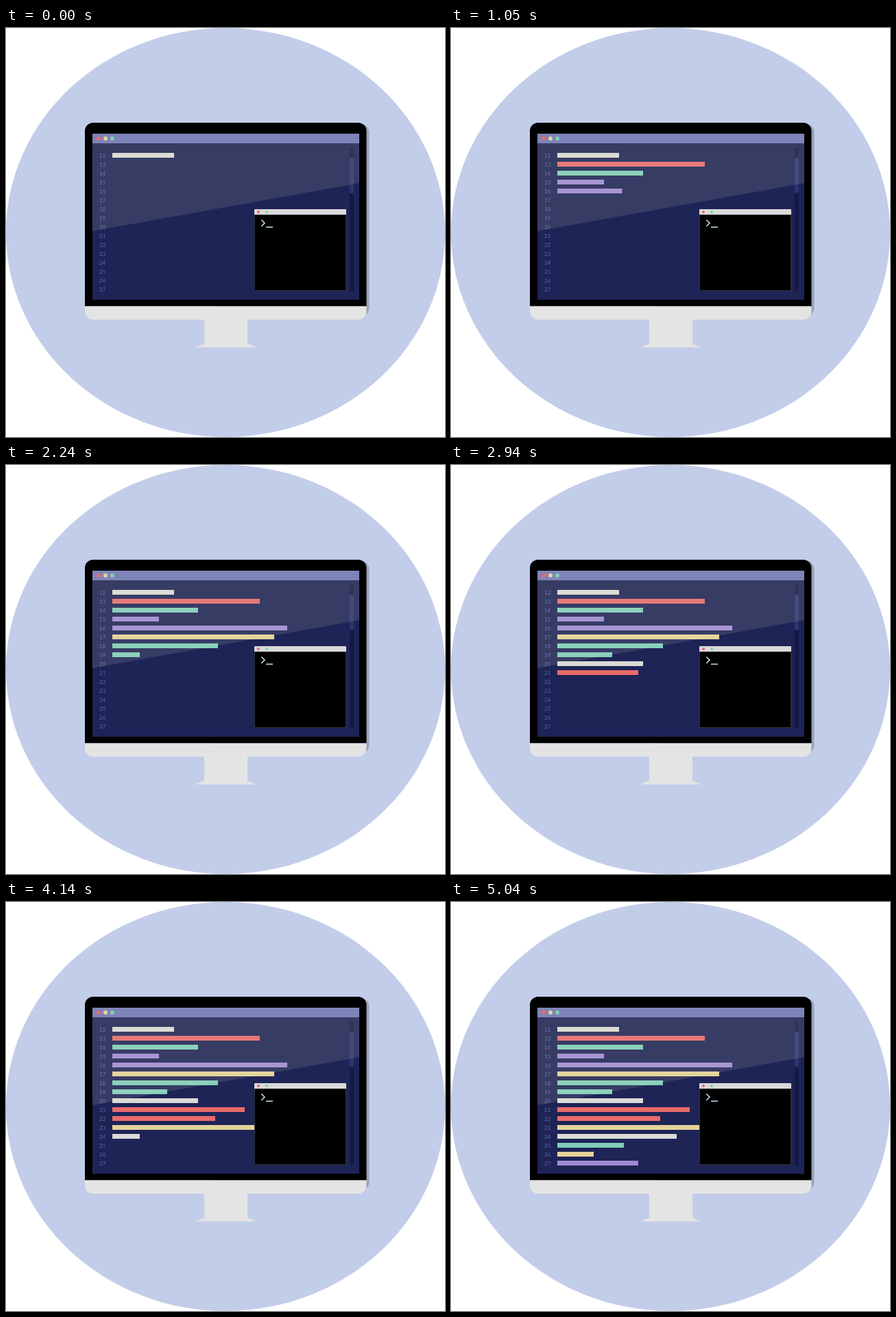
Write an HTML page without scripts that moves like this. It is 640 by 596 pixels and loops after 5.14 s.

```html
<!DOCTYPE html>
<html lang="en">
<head>
<meta charset="utf-8">
<title>Typing code</title>
<style>
  /* Total length of code typed so far; every bar takes its own share of it. */
  @property --typed {
    syntax: "<number>";
    inherits: true;
    initial-value: 0;
  }
  html, body { margin: 0; width: 100%; height: 100%; overflow: hidden; background: #fff; }
  svg { display: block; width: 640px; height: 596px; }

  .code { animation: type 5140ms infinite; }
  .code rect {
    x: 155px;
    height: 7px;
    width: calc(clamp(0, var(--typed) - var(--at), var(--len)) * 1px);
  }
  @keyframes type {
    0%     { --typed: 0;    animation-timing-function: steps(11); }
    11.08% { --typed: 283;  animation-timing-function: steps(16); }
    28.79% { --typed: 722;  animation-timing-function: steps(6); }
    35.79% { --typed: 898;  animation-timing-function: steps(4); }
    43.57% { --typed: 1093; animation-timing-function: steps(7); }
    57.19% { --typed: 1376; animation-timing-function: steps(12); }
    80.54% { --typed: 1886; animation-timing-function: steps(9); }
    98.05%, 100% { --typed: 2288; }
  }

  .white  { fill: #dadad6; }
  .red    { fill: #e96b6b; }
  .green  { fill: #80cfb9; }
  .purple { fill: #a08bd3; }
  .yellow { fill: #e5d398; }
  .metal  { fill: #e4e4e4; }
  .numbers {
    font: 7.6px Lato, sans-serif;
    letter-spacing: .4px;
    text-anchor: end;
    fill: #656ba8;
  }
</style>
</head>
<body>
<svg viewBox="0 0 640 596">
  <ellipse cx="320" cy="298" rx="320" ry="298" fill="#c2cde9"/>

  <!-- Monitor -->
  <rect x="300" y="140" width="229.5" height="280" rx="12" fill="#9aa3b8"/>
  <path class="metal" d="M289 424H352V460L365 465.5H275.5L289 460Z"/>
  <path d="M115 405.5V150a12 12 0 0 1 12-12H513.500a12 12 0 0 1 12 12V405.500Z"/>
  <path class="metal" d="M115 405.500H525.500V413a12 12 0 0 1-12 12H127a12 12 0 0 1-12-12Z"/>

  <!-- Editor -->
  <rect x="126" y="154" width="389" height="242" fill="#1e2456"/>
  <rect x="126" y="154" width="389" height="14" fill="#7f84b8"/>
  <circle class="red" cx="135" cy="161" r="3"/>
  <circle class="yellow" cx="145" cy="161" r="3"/>
  <circle class="green" cx="155" cy="161" r="3"/>
  <rect x="501" y="174" width="6" height="210" rx="3" fill="#151946"/>
  <rect x="501" y="189" width="6" height="52" rx="3" fill="#2d3470"/>

  <g class="numbers">
    <text x="145.600" y="189">12</text>
    <text x="145.600" y="202">13</text>
    <text x="145.600" y="215">14</text>
    <text x="145.600" y="228">15</text>
    <text x="145.600" y="241">16</text>
    <text x="145.600" y="254">17</text>
    <text x="145.600" y="267">18</text>
    <text x="145.600" y="280">19</text>
    <text x="145.600" y="293">20</text>
    <text x="145.600" y="306">21</text>
    <text x="145.600" y="319">22</text>
    <text x="145.600" y="332">23</text>
    <text x="145.600" y="345">24</text>
    <text x="145.600" y="358">25</text>
    <text x="145.600" y="371">26</text>
    <text x="145.600" y="384">27</text>
  </g>

  <g class="code">
    <rect class="white"  y="182" style="--at:-90;--len:90"/>
    <rect class="red"    y="195" style="--at:0;--len:215"/>
    <rect class="green"  y="208" style="--at:215;--len:125"/>
    <rect class="purple" y="221" style="--at:340;--len:68"/>
    <rect class="purple" y="234" style="--at:408;--len:255"/>
    <rect class="yellow" y="247" style="--at:663;--len:236"/>
    <rect class="green"  y="260" style="--at:899;--len:154"/>
    <rect class="green"  y="273" style="--at:1053;--len:80"/>
    <rect class="white"  y="286" style="--at:1133;--len:125"/>
    <rect class="red"    y="299" style="--at:1258;--len:193"/>
    <rect class="red"    y="312" style="--at:1451;--len:150"/>
    <rect class="yellow" y="325" style="--at:1601;--len:245"/>
    <rect class="white"  y="338" style="--at:1846;--len:174"/>
    <rect class="green"  y="351" style="--at:2020;--len:97"/>
    <rect class="yellow" y="364" style="--at:2117;--len:53"/>
    <rect class="purple" y="377" style="--at:2170;--len:118"/>
  </g>

  <path d="M126 168H515V226L126 296Z" fill="#dcdcc8" opacity=".13"/>

  <!-- Terminal -->
  <rect x="362.500" y="264.500" width="133" height="118" stroke="#33332f"/>
  <path d="M362 272V265a1 1 0 0 1 1-1H495a1 1 0 0 1 1 1V272Z" fill="#d9d9da"/>
  <circle class="red" cx="368" cy="268" r="2"/>
  <circle cx="374" cy="268" r="2" fill="#e2dccb"/>
  <circle class="green" cx="380" cy="268" r="2"/>
  <path d="M372.300 279.500L377 284.200L372.300 289M379 290.300H389" fill="none" stroke="#bfe0ec" stroke-width="1.600"/>
</svg>
</body>
</html>
```
